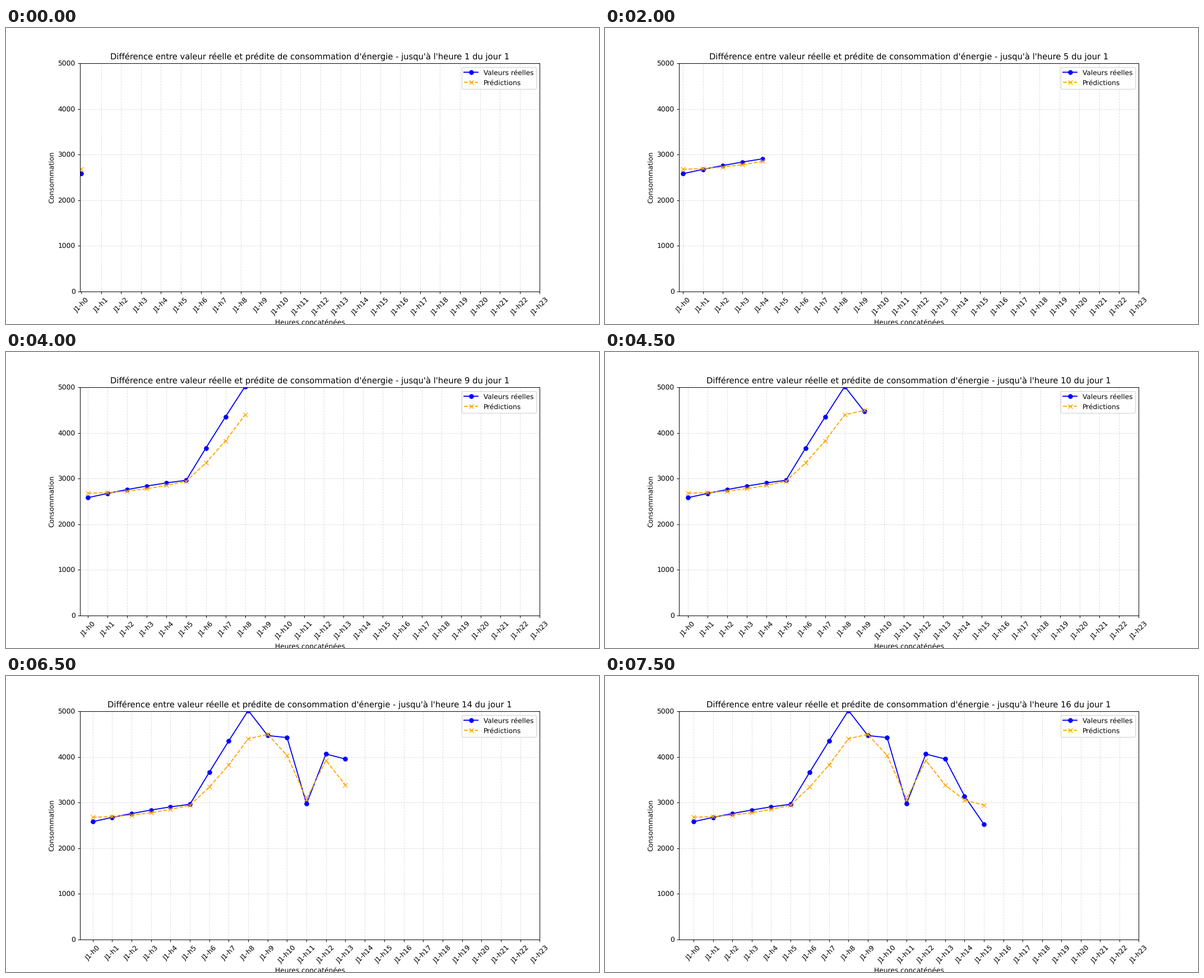
These frames come from a looping animation (1058 px wide and 529 px high, 8 s). A matplotlib script:

```python
import numpy as np
import matplotlib.pyplot as plt
from matplotlib.animation import FuncAnimation
from numpy.polynomial.polynomial import polyval

HOURS = 24
STEPS = 16
hours = np.arange(STEPS)


def load(night, climb, midday, afternoon):
    """Daily load: one polynomial (rising powers) per phase of the day."""
    phases = ((0, night), (5, climb), (9, midday), (12, afternoon))
    curve = np.zeros(STEPS)
    for start, coefs in phases:
        curve[start:] = polyval(hours[start:] - start, coefs)
    return curve


real = load(night=(2584, 97, -4), climb=(2965, 716, -10),
            midday=(4473, 658, -703), afternoon=(4067, 543, -802, 150))
pred = load(night=(2680, 5, 9.5), climb=(2943, 360, 42),
            midday=(4500, -220, -244), afternoon=(3926, -645, 106))

plt.rcParams["font.family"] = "DejaVu Sans"
plt.rcParams["text.hinting"] = "none"
fig, ax = plt.subplots(figsize=(12, 6), dpi=529 / 6)

real_line, = ax.plot([], [], color="blue", marker="o", label="Valeurs réelles")
pred_line, = ax.plot([], [], color="orange", marker="x", linestyle="--",
                     label="Prédictions")
title = ax.set_title("")
ax.set_xlabel("Heures concaténées")
ax.set_ylabel("Consommation")
ax.set_xticks(range(HOURS), [f"J1-h{h}" for h in range(HOURS)], rotation=45)
ax.set_ylim(0, 5000)
ax.grid(True, linestyle="--", alpha=0.4)
ax.legend(loc="upper right")


def draw(step):
    n = step + 1
    real_line.set_data(hours[:n], real[:n])
    pred_line.set_data(hours[:n], pred[:n])
    # The left margin is 5 % of the span drawn so far.
    ax.set_xlim(-max(0.055, 0.05 * step), HOURS - 1)
    title.set_text("Différence entre valeur réelle et prédite de consommation "
                   f"d'énergie - jusqu'à l'heure {n} du jour 1")
    return real_line, pred_line, title


def reset():
    return draw(0)


anim = FuncAnimation(fig, draw, frames=STEPS, init_func=reset,
                     interval=500, repeat=True, repeat_delay=0, blit=False)
plt.show()
```
